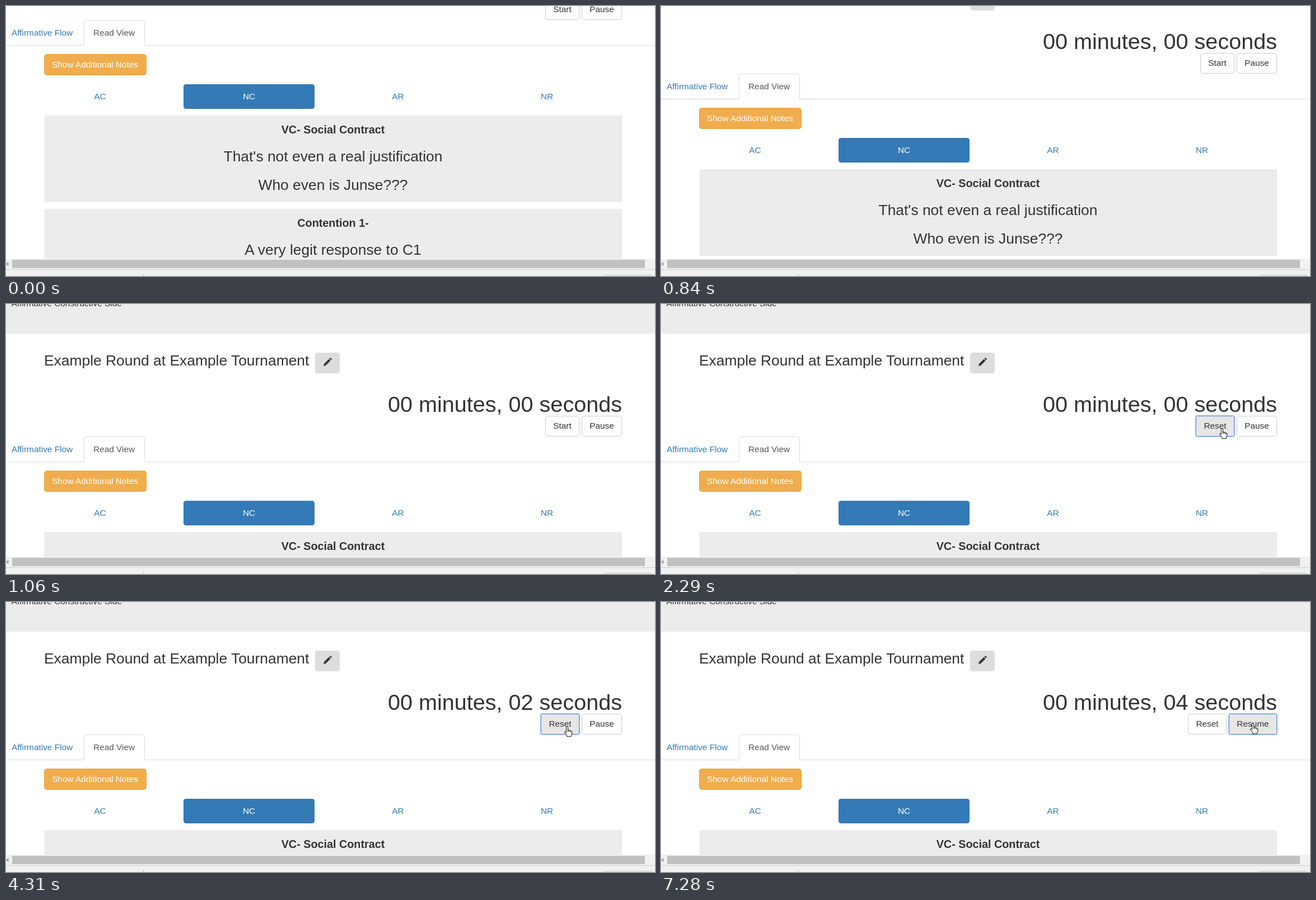
An HTML page for the animation above (8 s loop, 1159x483 px).

```html
<!DOCTYPE html>
<html lang="en">
<head>
<meta charset="utf-8">
<title>Read view timer</title>
<style>
html, body { margin: 0; width: 100%; height: 100%; overflow: hidden; background: #fff; }
svg { display: block; width: 1159px; height: 483px; font: 15.4px "Liberation Sans", Arial, sans-serif; fill: #333; }
text { white-space: pre; }
.link { fill: #337ab7; }
.light { fill: #fff; }
.mid { text-anchor: middle; }
.head { font-size: 19.8px; font-weight: bold; text-anchor: middle; }
.big { font-size: 26.4px; }
.timer { font-size: 39.6px; text-anchor: end; }
.panel { fill: #ececec; }
.line { fill: none; stroke: #ddd; }
.face { fill: #fff; stroke: #ccc; }
.hover .face { fill: #e6e6e6; stroke: #adadad; }
.focus .face { fill: #e6e6e6; stroke: #6d96d6; }
.press .face { fill: #d4d4d4; }
.ring { fill: none; stroke: #a3c1ee; visibility: hidden; }
.focus .ring { visibility: visible; }
.pointer path { fill: #fff; stroke: #111; stroke-linejoin: round; }
</style>
</head>
<body>
<svg viewBox="0 0 1159 483">
  <g id="page">
    <rect class="panel" y="-200" width="1159" height="253"/>
    <text x="9.5" y="3.5">Affirmative Constructive Side</text>

    <text class="big" x="68" y="109.5">Example Round at Example Tournament</text>
    <rect x="552" y="87" width="44" height="37" rx="4.4" fill="#ddd"/>
    <path d="M567 111L568 107 576.5 98.5 579.5 101.5 571 110ZM577.4 97.6L578.6 96.4Q579.2 95.8 579.8 96.4L581.6 98.2Q582.2 98.8 581.6 99.4L580.4 100.6Z"/>

    <text class="timer" id="timer" x="1100" y="193"></text>
    <g id="first"><rect class="face"/><rect class="ring"/><text class="mid" y="223"></text></g>
    <g id="second"><rect class="face"/><rect class="ring"/><text class="mid" y="223"></text></g>

    <path class="line" d="M0 282.5H139.5V241.5Q139.5 237.5 143.5 237.5H243.5Q247.5 237.5 247.5 241.5V282.5H1159"/>
    <text class="link" x="10" y="265">Affirmative Flow</text>
    <text x="156" y="265" fill="#555">Read View</text>

    <rect x="68.5" y="298.5" width="182" height="37" rx="4.4" fill="#f0ad4e" stroke="#eea236"/>
    <text class="light" x="82" y="322">Show Additional Notes</text>

    <rect x="317" y="352" width="234" height="44" rx="4.4" fill="#337ab7"/>
    <text class="link mid" x="168" y="379">AC</text>
    <text class="light mid" x="434" y="379">NC</text>
    <text class="link mid" x="700" y="379">AR</text>
    <text class="link mid" x="966" y="379">NR</text>

    <rect class="panel" x="68.5" y="408" width="1031.5" height="155"/>
    <text class="head" x="584" y="440">VC- Social Contract</text>
    <text class="big mid" x="584" y="490">That's not even a real justification</text>
    <text class="big mid" x="584" y="541">Who even is Junse???</text>
    <rect class="panel" x="68.5" y="575" width="1031.5" height="155"/>
    <text class="head" x="584" y="607">Contention 1-</text>
    <text class="big mid" x="584" y="657">A very legit response to C1</text>
  </g>

  <g id="chrome">
    <rect y="452" width="1159" height="31" fill="#f1f1f1"/>
    <rect x="11" y="454" width="1130" height="15" fill="#c1c1c1"/>
    <path d="M0 461.5L4.5 457.5V465.5Z" fill="#a3a3a3"/>
    <path d="M0 471.5H1159" stroke="#ccc"/>
    <path d="M245.5 479V483" stroke="#bbb"/>
    <rect x="1068.5" y="481.5" width="85" height="10" rx="2" fill="#fff" stroke="#bbb"/>
  </g>

  <g id="cursor" class="pointer">
    <path id="hand" d="M-1.5 11.5V1.8a1.5 1.5 0 0 1 3 0V7l2.5 .5 2.8 .8 2 1.2v4.5l-1.5 3V18.8h-7.5V16.8l-4.5-5.8q.6-2 2-1z M1.5 7V10 M4 7.5V10.5 M6.6 8.3V11"/>
    <path id="arrow" d="M.5 .5V16L4 12.7 6.4 18.2 8.6 17.2 6.3 11.8H11.2Z"/>
  </g>
</svg>
<script>
const LOOP = 8000, LINE = 212 / 11;
const WIDTH = { Start: 61, Reset: 69, Pause: 72, Resume: 86 };
const $ = id => document.getElementById(id);

// [time, scrolled lines]
const SCROLL = [[0, 0], [640, 1], [690, 2], [760, 3], [840, 5], [920, 7], [990, 9], [1060, 11]];
// [time, seconds]
const COUNT = [[0, 0], [3300, 1], [4310, 2], [5240, 3], [6250, 4]];
// [time, x, y]
const POINTER = [
  [0, 1300, 183],
  [1540, 1147, 183], [1610, 1120, 190], [1690, 1092, 203], [1770, 1062, 211],
  [1850, 1037, 217], [1920, 1016, 221], [2000, 1002, 222],
  [6480, 1006, 222], [6560, 1015, 221], [6640, 1026, 220], [6720, 1037, 219],
  [6800, 1047, 218], [6880, 1054, 217], [6960, 1057, 217]
];

const at = (steps, t) => steps.findLast(step => step[0] <= t);

function setAttrs(el, attrs) {
  for (const name in attrs) el.setAttribute(name, attrs[name]);
}

function drawButton(group, label, right, state) {
  const [face, ring, text] = group.children;
  const width = WIDTH[label], x = right - width;
  group.setAttribute("class", state);
  setAttrs(face, { x: x + .5, y: 200.5, width: width - 1, height: 36, rx: state.includes("focus") ? 2 : 4.4 });
  setAttrs(ring, { x: x - .5, y: 199.5, width: width + 1, height: 38, rx: 2 });
  text.setAttribute("x", x + width / 2);
  text.textContent = label;
  return x;
}

function render(t) {
  const [, lines] = at(SCROLL, t);
  $("page").setAttribute("transform", `translate(0 ${Math.round(lines * LINE) - 212})`);
  $("timer").textContent = `00 minutes, 0${at(COUNT, t)[1]} seconds`;

  const [, px, py] = at(POINTER, t);
  const onButtons = px < 1100 && py > 200;
  $("cursor").setAttribute("transform", `translate(${px} ${py})`);
  $("hand").style.display = onButtons ? "" : "none";
  $("arrow").style.display = onButtons ? "none" : "";

  const hover = !onButtons ? "" : px < 1024 ? "first" : px >= 1028 ? "second" : "";
  const focus = t < 2150 ? "" : t < 7110 ? "first" : "second";
  const pressed = (t >= 2150 && t < 2290) || (t >= 7110 && t < 7280);
  const state = id => [hover === id && "hover", focus === id && "focus",
    focus === id && pressed && "press"].filter(Boolean).join(" ");

  const left = drawButton($("second"), t < 7280 ? "Pause" : "Resume", 1100, state("second"));
  drawButton($("first"), t < 2290 ? "Start" : "Reset", left - 4, state("first"));
}

const start = performance.now();
function tick() {
  render((performance.now() - start) % LOOP);
  requestAnimationFrame(tick);
}
tick();
</script>
</body>
</html>
```
